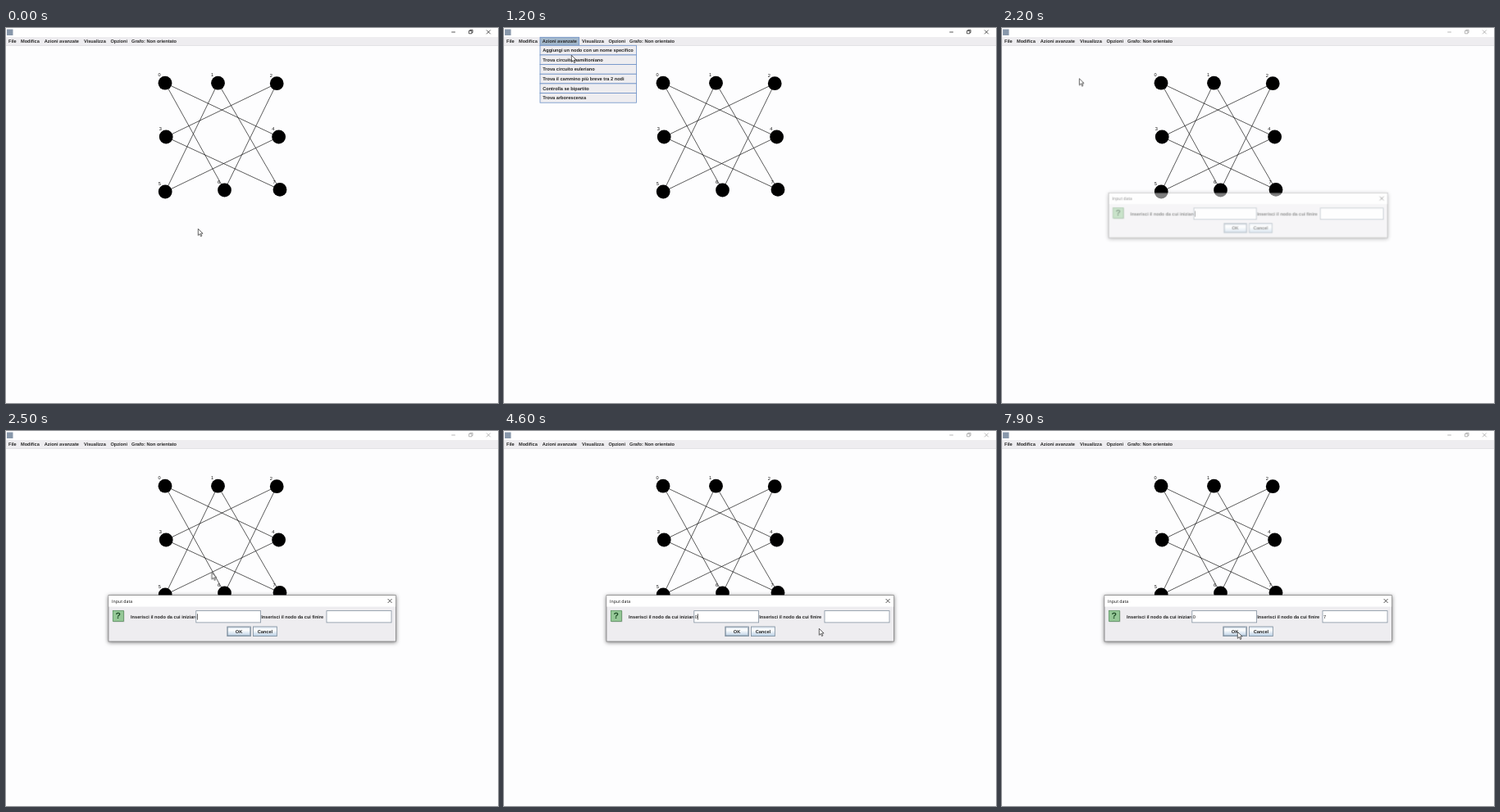
Recreate the animation shown at these times as an HTML page. Size 600 by 458 pixels, loop 8000 ms.

```html
<!DOCTYPE html>
<html lang="it">
<head>
<meta charset="utf-8">
<title>Grafo</title>
<style>
html, body { margin: 0; width: 100%; height: 100%; overflow: hidden; background: #fdfdfe; }
svg { display: block; width: 100%; height: 100%; }
text { font: 5.63px "Liberation Sans", Arial, sans-serif; fill: #111; text-rendering: geometricPrecision; }
.b { font-weight: bold; fill: #262626; }
.title { font: 5.25px "Open Sans", sans-serif; fill: #111; }
.mid { text-anchor: middle; }
.line { fill: none; stroke: #111; stroke-width: .7; }
.edges { fill: none; stroke: #151515; stroke-width: .7; }
.cell { fill: #eeedf0; stroke: #6c8fc6; stroke-width: .8; }
.field { fill: #fff; stroke: #8492a0; stroke-width: .8; }
.button { fill: url(#shade); stroke: #7a8a99; stroke-width: .8; }
.caret { fill: #222; }

/* One percent is 80 ms; the picture advances every 100 ms. */
.anim { animation: 8s step-end -5ms infinite; }
#menu { animation-name: menu; }
#active { animation-name: active; }
#idle { animation-name: idle; }
#dialog { animation-name: dialog; transform-origin: 300px 229px; }
#caret1 { animation-name: caret1; }
#caret2 { animation-name: caret2; }
#first { animation-name: first; }
#last { animation-name: last; }
#arrow { animation-name: arrow; }
#beam { animation-name: beam; }
#pointer { animation-name: pointer; }

@keyframes menu { 0%, 25%, 100% { opacity: 0 } 12.5% { opacity: 1 } }
@keyframes active { 0% { opacity: 1 } 26.25%, 100% { opacity: 0 } }
@keyframes idle { 0% { opacity: 0 } 26.25%, 100% { opacity: 1 } }
@keyframes dialog {
  0%, 26.25% { opacity: 0; transform: scale(.95) }
  27.5% { opacity: .5; transform: scale(.97) }
  28.75% { opacity: .87; transform: scale(.993) }
  30%, 100% { opacity: 1; transform: none }
}
@keyframes caret1 {
  0%, 33.75%, 46.25% { opacity: 0; transform: none }
  27.5%, 40%, 52.5% { opacity: 1; transform: none }
  55%, 67.5% { opacity: 1; transform: translateX(2.9px) }
  61.25%, 73.75%, 100% { opacity: 0; transform: translateX(2.9px) }
}
@keyframes caret2 {
  0%, 80% { opacity: 0; transform: none }
  73.75%, 86.25% { opacity: 1; transform: none }
  88.75% { opacity: 1; transform: translateX(3px) }
  95%, 100% { opacity: 0; transform: translateX(3px) }
}
@keyframes first { 0% { opacity: 0 } 55%, 100% { opacity: 1 } }
@keyframes last { 0% { opacity: 0 } 88.75%, 100% { opacity: 1 } }
@keyframes arrow { 0%, 56.25%, 87.5%, 100% { opacity: 1 } 37.5%, 63.75% { opacity: 0 } }
@keyframes beam { 0%, 56.25%, 87.5%, 100% { opacity: 0 } 37.5%, 63.75% { opacity: 1 } }
@keyframes pointer {
  0% { transform: translate(234px, 245px); animation-timing-function: steps(3) }
  3.75% { transform: translate(205px, 205px); animation-timing-function: steps(3) }
  7.5% { transform: translate(110px, 70px); animation-timing-function: steps(3) }
  11.25%, 12.5% { transform: translate(64px, 15px); animation-timing-function: steps(2) }
  15% { transform: translate(82px, 33px); animation-timing-function: steps(3) }
  18.75% { transform: translate(92px, 55px); animation-timing-function: steps(3) }
  22.5% { transform: translate(94px, 61.5px) }
  27.5% { transform: translate(94px, 61.5px); animation-timing-function: steps(5) }
  33.75% { transform: translate(355px, 247px); animation-timing-function: steps(3) }
  37.5% { transform: translate(296px, 232px); animation-timing-function: steps(3) }
  41.25% { transform: translate(283px, 227.5px) }
  53.75% { transform: translate(283px, 227.5px); animation-timing-function: steps(3) }
  57.5% { transform: translate(384px, 241px); animation-timing-function: steps(2) }
  60% { transform: translate(405px, 238px); animation-timing-function: steps(4) }
  65% { transform: translate(421px, 232px); animation-timing-function: steps(2) }
  67.5% { transform: translate(421.5px, 232px) }
  72.5% { transform: translate(422.5px, 232px) }
  73.75% { transform: translate(423.3px, 231.5px) }
  83.75% { transform: translate(423.8px, 231.5px) }
  86.25% { transform: translate(423.8px, 231.5px); animation-timing-function: steps(3) }
  90% { transform: translate(400px, 250px); animation-timing-function: steps(2) }
  92.5% { transform: translate(360px, 259px); animation-timing-function: steps(3) }
  96.25% { transform: translate(321px, 246px) }
  97.5% { transform: translate(305px, 245px) }
  98.75%, 100% { transform: translate(287px, 245px) }
}
</style>
</head>
<body>
<svg viewBox="0 0 600 458">
  <defs>
    <linearGradient id="shade" x2="0" y2="1">
      <stop offset="0" stop-color="#dde8f3"/>
      <stop offset=".35" stop-color="#fff"/>
      <stop offset="1" stop-color="#b8cfe5"/>
    </linearGradient>
    <g id="controls">
      <path d="M543.3 5h4.6M564.6 3.4h3.4v3.4h-3.4zM565.8 3.2v-.9h3.3v3.3h-.9M586 2.5l4.8 4.8m0-4.8l-4.8 4.8"/>
    </g>
  </defs>

  <rect width="600" height="458" fill="#fdfdfe"/>
  <rect width="600" height="11" fill="#fff"/>
  <rect y="11" width="600" height="10.4" fill="#eeedf0"/>
  <rect y="21.2" width="600" height=".6" fill="#d8d8da"/>
  <rect x="1" y="1.5" width="7.5" height="7.5" fill="#8797aa"/>
  <use id="active" class="anim line" href="#controls"/>
  <use id="idle" class="anim line" href="#controls" style="stroke:#999"/>

  <g id="graph"></g>

  <g id="menu" class="anim">
    <rect x="44" y="11.3" width="47.5" height="9.9" fill="#a3b8cc" stroke="#6c8fc6" stroke-width=".8"/>
    <g id="items"></g>
  </g>
  <g id="bar"></g>

  <g id="dialog" class="anim">
    <g style="filter:drop-shadow(0 1px 2.5px #0008)">
      <rect x="125" y="200.7" width="350.5" height="56.3" fill="#eeedf0" stroke="#777" stroke-width=".7"/>
    </g>
    <rect x="125.4" y="201" width="349.7" height="13.6" fill="#fff"/>
    <text class="title" x="129" y="209.8">Input data</text>
    <path class="line" d="M465.6 205l5 5m0-5l-5 5"/>
    <rect x="131" y="220" width="13.3" height="13.3" fill="#bbb"/>
    <rect x="130.3" y="219.3" width="13" height="13" fill="#95c897" stroke="#4f8a55" stroke-width=".7"/>
    <text class="b mid" x="136.8" y="229.4" style="font-size:10.5px;fill:#1d4a25">?</text>
    <text class="b" x="152" y="229.1">Inserisci il nodo da cui iniziare</text>
    <text class="b" x="311.3" y="229.1">Inserisci il nodo da cui finire</text>
    <rect class="field" x="231.8" y="219.6" width="78.8" height="14.3"/>
    <rect class="field" x="391" y="219.6" width="79" height="14.3"/>
    <rect class="button" x="269.8" y="239" width="28.6" height="11.6"/>
    <rect x="270.6" y="239.8" width="27" height="10" fill="none" stroke="#7a8a99" stroke-width=".6"/>
    <rect class="button" x="301.5" y="239" width="28.8" height="11.6"/>
    <text class="b mid" x="284" y="246.9">OK</text>
    <text class="b mid" x="315.9" y="246.9">Cancel</text>
    <text id="first" class="anim" x="232.8" y="229.1">0</text>
    <text id="last" class="anim" x="392" y="229.1">7</text>
    <rect id="caret1" class="anim caret" x="233" y="223.3" width=".7" height="7.3"/>
    <rect id="caret2" class="anim caret" x="392.2" y="223.3" width=".7" height="7.3"/>
  </g>

  <g id="pointer" class="anim">
    <path id="arrow" class="anim" d="M.3 .3v8l1.9-1.8 1.4 3 1.3-.6-1.4-2.9h2.6z" fill="#fff" stroke="#111" stroke-width=".65"/>
    <path id="beam" class="anim line" d="M-1.6-3.8h1.2l.4.4.4-.4h1.2M0-3.4v6.8M-1.6 3.8h1.2l.4-.4.4.4h1.2"/>
  </g>
</svg>
<script>
const nodes = [[194, 67.2], [258.5, 67.2], [330.2, 67.7], [195.2, 133], [332.6, 133], [194.2, 200], [266.5, 198], [334, 197.4]];
const edges = ["04", "06", "15", "17", "23", "26", "37", "45"];
const bar = [[3, "File"], [18, "Modifica"], [46.7, "Azioni avanzate"], [95, "Visualizza"], [127.4, "Opzioni"], [153, "Grafo: Non orientato"]];
const items = ["Aggiungi un nodo con un nome specifico", "Trova circuito hamiltoniano", "Trova circuito euleriano",
  "Trova il cammino più breve tra 2 nodi", "Controlla se bipartito", "Trova arborescenza"];

const fill = (id, parts) => document.getElementById(id).innerHTML = parts.join("");
const label = (x, y, s, c = "b") => `<text class="${c}" x="${x}" y="${y}">${s}</text>`;

fill("graph", [
  `<path class="edges" d="${edges.map(([a, b]) => `M${nodes[a]}L${nodes[b]}`).join("")}"/>`,
  ...nodes.map(([x, y], i) => `<circle cx="${x}" cy="${y}" r="8.4"/>` + label(x - 8.4, y - 7.8, i, ""))
]);
fill("bar", bar.map(([x, s]) => label(x, 17.9, s)));
fill("items", items.map((s, i) => {
  const y = 21.3 + i * 11.65;
  return `<rect class="cell" x="44" y="${y}" width="117.5" height="11.65"/>` + label(47.2, y + 7.7, s);
}));
</script>
</body>
</html>
```
